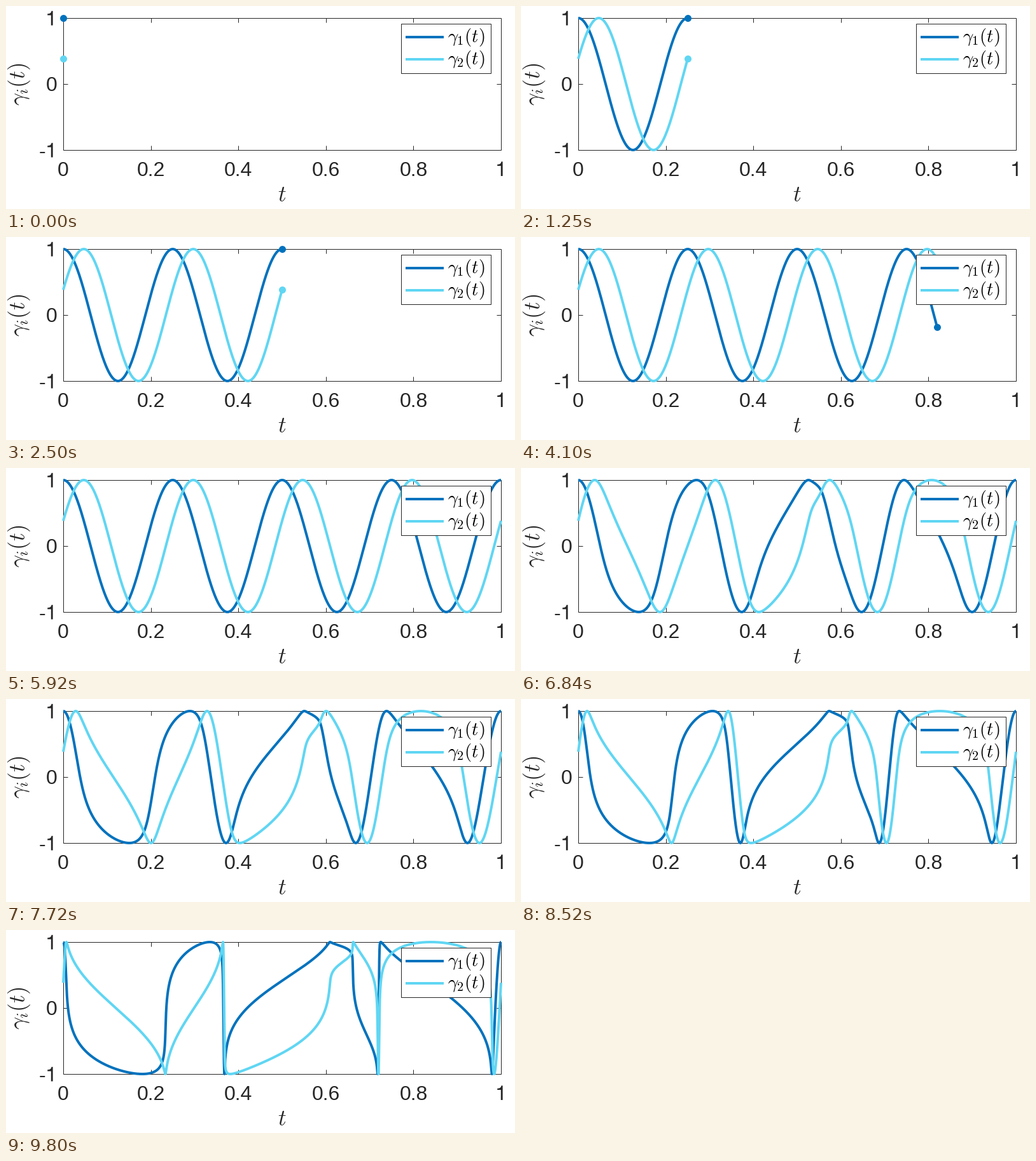
These frames come from a looping animation (800x320 px, 9.84 s). A matplotlib script:

```python
import numpy as np
import matplotlib.pyplot as plt
from matplotlib.animation import FuncAnimation
from matplotlib.patches import Polygon, Rectangle

plt.rcParams["mathtext.fontset"] = "cm"
plt.rcParams["font.family"] = "Liberation Sans"

DPI, LOOP, STEP = 100, 9840, 20
PX = 72 / DPI
LEFT, RIGHT, TOP, BOTTOM = 90, 778, 19, 227
INK, DARK, LIGHT = "#262626", "#0072bd", "#60d6f3"
FONT = 32

# Timeline in ms
TRACE_STEP, TRACE_END = 50, 5000
WARP_START, HOLD_START, HOLD_END = 5920, 8520, 9600
WARP_STEP, WARP_FRAMES = 40, 97

# Where the warp dwells: centre, width and height of each bump in dt/du
DWELLS = [(.1095, .0211, 4.18), (.2345, .0205, 2.47), (.4525, .0185, 5.13),
          (.5143, .0055, 3.60), (.5770, .0135, 1.58), (.7990, .0205, 4.89),
          (.9700, .0500, 0.18)]
BASE_RATE = 0.04


def time_warp(u):
    """Integrate a periodic sum of Gaussian bumps, scaled to run from 0 to 1."""
    rate = np.full_like(u, BASE_RATE)
    for centre, width, height in DWELLS:
        d = (u - centre + 0.5) % 1 - 0.5
        rate += height * np.exp(-0.5 * (d / width) ** 2)
    total = np.concatenate([[0], np.cumsum(rate[1:] + rate[:-1])])
    return total / total[-1]


def to_x(t):
    return LEFT + (RIGHT - LEFT) * t


def to_y(v):
    return (TOP + BOTTOM) / 2 - (BOTTOM - TOP) / 2 * v


u = np.linspace(0, 1, 2001)
warped = time_warp(u)
waves = [np.cos(8 * np.pi * u), np.cos(8 * np.pi * u - 3 * np.pi / 8)]

fig = plt.figure(figsize=(8, 3.2), dpi=DPI, facecolor="white")
ax = fig.add_axes([0, 0, 1, 1])
ax.set_xlim(0, 800)
ax.set_ylim(320, 0)
ax.axis("off")


def segment(xs, ys, color=INK, width=1, z=1):
    ax.plot(xs, ys, color=color, lw=width * PX, zorder=z, solid_capstyle="butt")


def label(x, y, text, size=FONT, ha="center", color=INK, z=1, **kw):
    ax.text(x, y, text, fontsize=size * PX, ha=ha, va="baseline",
            color=color, zorder=z, **kw)


def plain_one(x, y):
    """Digit one without a foot; x is the left edge of its advance."""
    shape = np.array([(.275, 0), (.275, .499), (.101, .499), (.101, .568),
                      (.19, .578), (.25, .61), (.28, .65), (.297, .709),
                      (.363, .709), (.363, 0)])
    ax.add_patch(Polygon(shape * [FONT, -FONT] + [x, y], fc=INK, lw=0, zorder=1))


def draw_axes():
    ax.add_patch(Rectangle((LEFT, TOP), RIGHT - LEFT, BOTTOM - TOP,
                           fill=False, ec=INK, lw=PX, zorder=1))
    tick, base = 7, 268
    for t in (0.2, 0.4, 0.6, 0.8):
        x = to_x(t)
        segment([x, x], [BOTTOM, BOTTOM - tick])
        segment([x, x], [TOP, TOP + tick])
        label(x, base, f"{t:.1f}")
    y = to_y(0)
    segment([LEFT, LEFT + tick], [y, y])
    segment([RIGHT, RIGHT - tick], [y, y])

    label(LEFT, base, "0")
    plain_one(RIGHT - 9, base)
    label(80, 134.5, "0", ha="right")
    for y in (30.5, 238.5):
        plain_one(62, y)
    label(62, 238.5, "-", ha="right")

    label(434, 308, "$t$", 35.2)
    label(30, 123, r"$\gamma_i(t)$", 35.2, rotation=90, rotation_mode="anchor")


def draw_legend():
    ax.add_patch(Rectangle((621, 28), 141, 78, fc="white", ec=INK,
                           lw=PX, zorder=5))
    for i, (y, color) in enumerate([(49, DARK), (84, LIGHT)], 1):
        segment([628, 688], [y, y], color, 4, 6)
        label(694.5, y + 8, rf"$\gamma_{i}(t)$", 28.8, "left", "black", 6)


draw_axes()
draw_legend()
curves, heads = [], []
for color in (DARK, LIGHT):
    curves += ax.plot([], [], color=color, lw=4 * PX, zorder=3,
                      solid_joinstyle="round", solid_capstyle="butt")
    heads += ax.plot([], [], "o", color=color, ms=11 * PX, mew=0, zorder=4)


def update(n):
    ms = n * STEP + STEP // 2
    tracing = ms < WARP_START
    if tracing:
        end = min(ms // TRACE_STEP * TRACE_STEP / TRACE_END, 1)
        count = int(round(end * (len(u) - 1))) + 1
        x = to_x(u[:count])
    else:
        if HOLD_START <= ms < HOLD_END:
            ms = HOLD_START
        s = (ms - WARP_START) // WARP_STEP / WARP_FRAMES
        count = len(u)
        x = to_x((1 - s) * u + s * warped)
    for curve, head, wave in zip(curves, heads, waves):
        y = to_y(wave[:count])
        curve.set_data(x, y)
        head.set_data(x[-1:], y[-1:])
        head.set_visible(tracing)
    return curves + heads


anim = FuncAnimation(fig, update, frames=LOOP // STEP, interval=STEP,
                     repeat=True, repeat_delay=0, blit=False)
plt.show()
```
